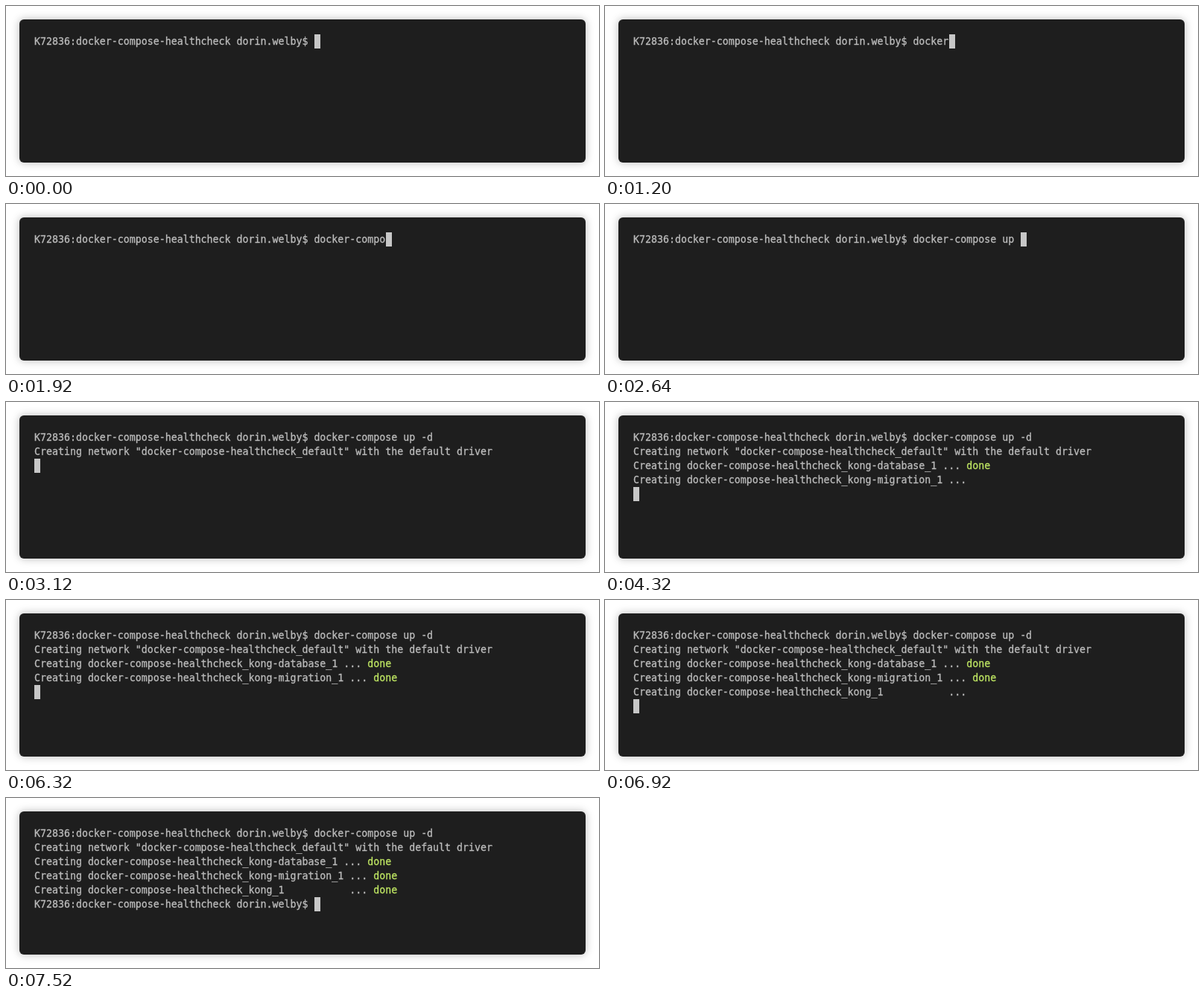
Write an HTML page that moves like this. It is 796 by 228 pixels and loops after 9.52 s.

```html
<!DOCTYPE html>
<html lang="en">
<head>
<meta charset="utf-8">
<title>Terminal session</title>
<style>
  html, body { margin: 0; width: 100%; height: 100%; overflow: hidden; background: #fff; }

  .window {
    position: absolute; left: 18px; top: 18px; width: 760px; height: 192px;
    border-radius: 6px; background: #1e1e1e; overflow: hidden;
    box-shadow: 0 0 12px rgba(0, 0, 0, .28);
  }

  /* 13.288px gives an 8px character cell */
  .screen {
    position: absolute; left: 20px; top: 20px; width: 720px; height: 152px;
    font: 13.288px/19px "DejaVu Sans Mono", monospace;
    color: #bcbcbc; -webkit-text-stroke: .3px;
  }
  .line { height: 19px; white-space: pre; }
  .done { color: #bfe663; }

  .cmd, .cursor, .show { animation: 9520ms step-end infinite; }
  .cmd {
    display: inline-block; height: 19px; overflow: hidden; vertical-align: top;
    animation-name: type;
  }
  .cursor {
    position: absolute; left: 0; top: 0; width: 8px; height: 19px;
    background: #c7c7c7; animation-name: cursor;
  }

  .network { animation-name: network; }
  .database { animation-name: database; }
  .database-done { animation-name: database-done; }
  .migration { animation-name: migration; }
  .migration-done { animation-name: migration-done; }
  .kong { animation-name: kong; }
  .kong-done { animation-name: kong-done; }
  .prompt { animation-name: prompt; }

  /* one character every 120ms */
  @keyframes type {
    0% { width: 0; }
    4.94% { width: 0; animation-timing-function: steps(20, end); }
    30.15%, 100% { width: 160px; }
  }
  @keyframes cursor {
    0% { transform: translate(376px, 0); }
    4.94% { transform: translate(376px, 0); animation-timing-function: steps(20, end); }
    30.15% { transform: translate(536px, 0); }
    31.51% { transform: translate(0, 19px); }
    32.77% { transform: translate(0, 38px); }
    36.97% { transform: translate(0, 57px); }
    45.37% { transform: translate(0, 76px); }
    72.68% { transform: translate(0, 95px); }
    78.98%, 100% { transform: translate(376px, 95px); }
  }
  @keyframes network { 0% { visibility: hidden; } 32.77%, 100% { visibility: visible; } }
  @keyframes database { 0% { visibility: hidden; } 36.97%, 100% { visibility: visible; } }
  @keyframes database-done { 0% { visibility: hidden; } 39.07%, 100% { visibility: visible; } }
  @keyframes migration { 0% { visibility: hidden; } 45.37%, 100% { visibility: visible; } }
  @keyframes migration-done { 0% { visibility: hidden; } 66.38%, 100% { visibility: visible; } }
  @keyframes kong { 0% { visibility: hidden; } 72.68%, 100% { visibility: visible; } }
  @keyframes kong-done { 0% { visibility: hidden; } 73.73%, 100% { visibility: visible; } }
  @keyframes prompt { 0% { visibility: hidden; } 78.98%, 100% { visibility: visible; } }
</style>
</head>
<body>
<div class="window">
  <div class="screen">
    <div class="line">K72836:docker-compose-healthcheck dorin.welby$ <span class="cmd">docker-compose up -d</span></div>
    <div class="line show network">Creating network "docker-compose-healthcheck_default" with the default driver</div>
    <div class="line show database">Creating docker-compose-healthcheck_kong-database_1 ... <span class="done show database-done">done</span></div>
    <div class="line show migration">Creating docker-compose-healthcheck_kong-migration_1 ... <span class="done show migration-done">done</span></div>
    <div class="line show kong">Creating docker-compose-healthcheck_kong_1           ... <span class="done show kong-done">done</span></div>
    <div class="line show prompt">K72836:docker-compose-healthcheck dorin.welby$ </div>
    <div class="cursor"></div>
  </div>
</div>
</body>
</html>
```
